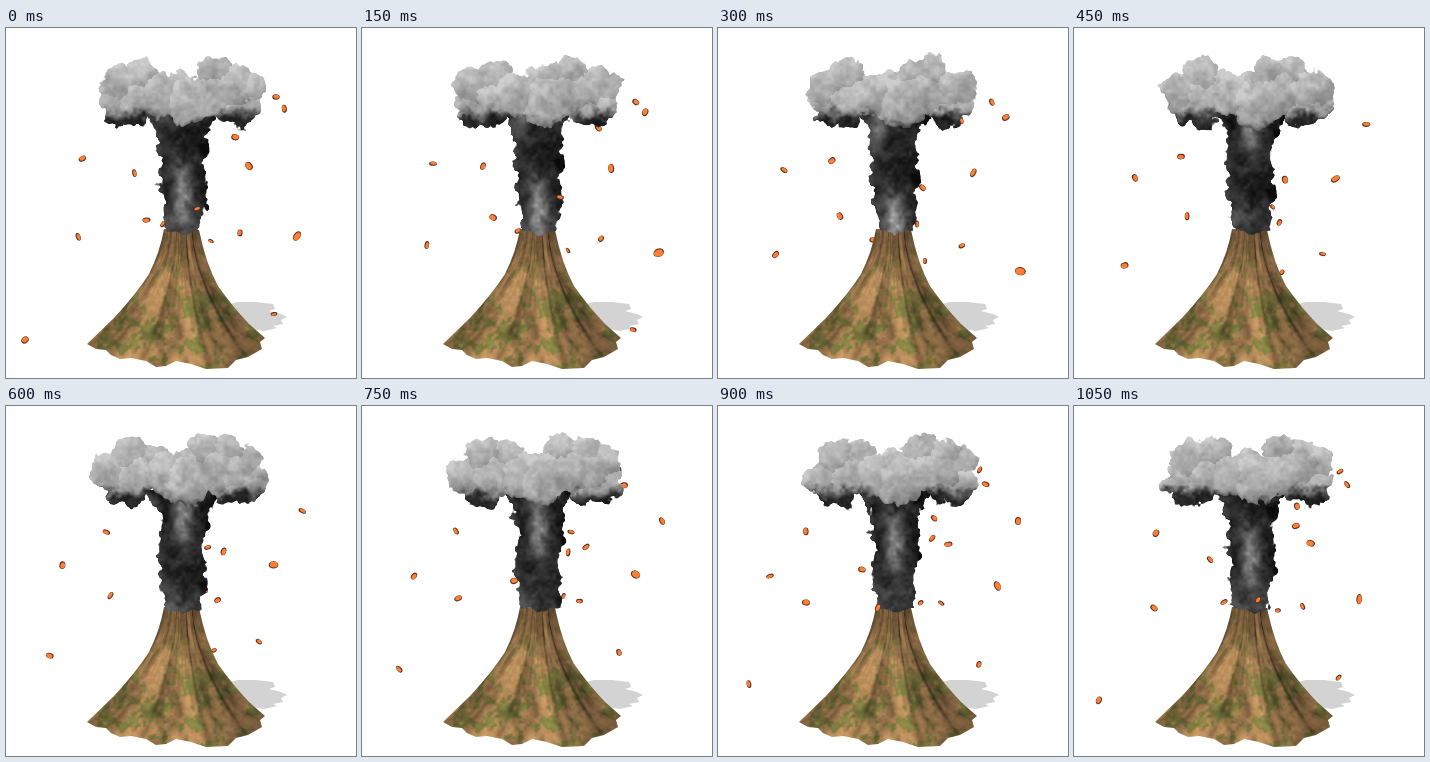
These frames come from a looping animation (350x350 px, 1.2 s). An HTML page with a canvas:

```html
<!DOCTYPE html>
<html lang="en">
<head>
<meta charset="utf-8">
<title>Volcano</title>
<style>
html, body { margin: 0; width: 100%; height: 100%; overflow: hidden; background: #fff; }
canvas { display: block; width: 100vw; height: 100vh; }
</style>
</head>
<body>
<canvas id="stage" width="350" height="350"></canvas>
<script>
const start = performance.now();
const SIZE = 350, STEPS = 8, STEP_MS = 150;
const SCROLL = 120; // vertical period of the smoke texture

const clamp = (v, lo = 0, hi = 1) => Math.min(hi, Math.max(lo, v));
const mix = (a, b, t) => a + (b - a) * t;
const smooth = (a, b, v) => { const t = clamp((v - a) / (b - a)); return t * t * (3 - 2 * t); };
const bell = v => Math.exp(-v * v);

function hash(i, j) {
  let h = Math.imul(i, 374761393) ^ Math.imul(j, 668265263);
  h = Math.imul(h ^ h >>> 13, 1274126177);
  return ((h ^ h >>> 16) >>> 0) / 2 ** 32;
}

function noise(x, y, cell) {
  const rows = SCROLL / cell;
  x /= cell; y /= cell;
  const i = Math.floor(x), j = Math.floor(y);
  const fx = smooth(0, 1, x - i), fy = smooth(0, 1, y - j);
  const row = n => ((n % rows) + rows) % rows;
  const a = row(j), b = row(j + 1);
  return mix(mix(hash(i, a), hash(i + 1, a), fx), mix(hash(i, b), hash(i + 1, b), fx), fy);
}

const fbm = (x, y) => .42 * noise(x, y, 12) + .33 * noise(x + 500, y, 6) + .25 * noise(x + 900, y, 3);

// Quadratic through three [time, x, y] points.
function along([a, b, c], k) {
  const wa = (k - b[0]) * (k - c[0]) / ((a[0] - b[0]) * (a[0] - c[0]));
  const wb = (k - a[0]) * (k - c[0]) / ((b[0] - a[0]) * (b[0] - c[0]));
  const wc = 1 - wa - wb;
  return [1, 2].map(n => wa * a[n] + wb * b[n] + wc * c[n]);
}

function layer(x0, y0, x1, y1, shade) {
  const canvas = document.createElement('canvas');
  canvas.width = canvas.height = SIZE;
  const g = canvas.getContext('2d');
  const image = g.createImageData(x1 - x0, y1 - y0);
  let p = 0;
  for (let y = y0; y < y1; y++) for (let x = x0; x < x1; x++, p += 4) {
    const c = shade(x, y);
    if (c) for (let n = 0; n < 4; n++) image.data[p + n] = c[n];
  }
  g.putImageData(image, x0, y0);
  return canvas;
}

// ---- Mountain ----
const coneShape = new Path2D(`M158 201 Q154 224 143 246 Q131 265 108 290 L81 316 L90 321 L100 322
  L105 327 L114 331 L125 330 L140 333 L150 339 L160 338 L170 333 L185 336 L200 341 L222 340
  L230 332 L242 329 L256 321 L254 314 L259 310 L243 296 Q226 278 212 258 Q200 236 193 202 Z`);
const shadowShape = new Path2D(`M220 277 L232 274 L250 274 L267 276 L269 281 L263 283 L275 286
  L281 289 L275 292 L277 296 L267 298 L271 300 L258 303 L240 300 Z`);

function coneColor(x, y) {
  const wide = 17 + 74 * Math.max(0, (y - 203) / 110) ** 1.7;
  const u = (x - 176) / wide;
  const ridge = noise(u * 46 + 200, y * .16, 6);
  const fine = noise(u * 60 + 700, y * .4, 3);
  const patch = fbm(x + 300, y * 1.15);
  let light = .62 + .36 * ridge + .2 * fine + .4 * (patch - .5);
  light *= 1 - .24 * smooth(.1, .7, u) - .14 * smooth(-.55, -1, u);
  light *= mix(.74, 1, smooth(203, 240, y));
  light -= .22 * bell((u - .22) / .035) + .2 * bell((u - .58) / .03) + .12 * bell((u + .35) / .03);
  const green = smooth(.46, .62, fbm(x * 1.1 + 40, y + 17)) * mix(.2, .85, smooth(215, 290, y));
  const tone = (a, b) => mix(a, b, green) * light;
  return [tone(178, 122), tone(136, 126), tone(88, 62), 255];
}

const cone = layer(75, 198, 262, 343, coneColor);
{
  const g = cone.getContext('2d');
  g.globalCompositeOperation = 'destination-in';
  g.fill(coneShape);
}

// ---- Smoke ----
// Resting puffs: x, y, radius, depth
const puffs = [
  [107, 70, 16, 0], [111, 86, 13, -4], [128, 88, 13, 0], [132, 70, 21, 6], [157, 68, 22, 12],
  [181, 74, 25, 14], [206, 66, 21, 10], [225, 62, 20, 5], [242, 57, 17, 2], [243, 76, 16, 0],
  [222, 82, 16, 2], [236, 87, 12, -3], [176, 58, 16, 6]
];
// Puffs that roll outward over several loops.
const rollers = [
  { from: 3, to: 23, r: 19, path: [[3, 150, 57], [10, 129, 48], [20, 102, 66]] },
  { from: 9, to: 29, r: 18, path: [[9, 191, 48], [16, 207, 44], [26, 240, 60]] }
];

function puffsAt(step) {
  const list = puffs.map(([x, y, r, z], n) => {
    const turn = 2 * Math.PI * step / STEPS + n * 2.4;
    return [x + 2 * Math.cos(turn), y + 1.5 * Math.sin(turn), r, z];
  });
  for (const { from, to, r, path } of rollers)
    for (let k = step; k <= to; k += STEPS) if (k >= from) {
      const grow = Math.min(1, .8 + (k - from) / 10, .5 + (to - k) / 6);
      list.push([...along(path, k), r * grow, 5]);
    }
  return list;
}

function smoke(step) {
  const list = puffsAt(step);
  const drift = step * SCROLL / STEPS;
  const streakY = 95 + (step + 5) % STEPS * 14;

  function cap(x, y, a, b) {
    const px = x + 13 * (a - .5), py = y + 13 * (b - .5);
    let top = -99, alpha = 0, up = 0, side = 0;
    for (const [cx, cy, r, z] of list) {
      const dx = px - cx, dy = py - cy, d2 = dx * dx + dy * dy;
      if (d2 >= r * r) continue;
      alpha = Math.max(alpha, clamp(r - Math.sqrt(d2)));
      const h = Math.sqrt(r * r - d2) + z;
      if (h > top) { top = h; up = -dy / r; side = dx / r; }
    }
    if (!alpha) return null;
    const edge = 85 + 13 * bell((x - 180) / 24);
    const grey = 172 + 24 * up - 8 * side + 75 * (a - .5) + 30 * (b - .5);
    const dark = smooth(edge - 8, edge + 9, y + 22 * (b - .5));
    return [clamp(mix(grey, 36 + 50 * (a - .5), dark), 12, 205), alpha];
  }

  function stem(x, y, a, b) {
    if (y < 84) return null;
    const flare = Math.exp(-(y - 88) / 11);
    const left = 153 - 12 * flare + 6 * clamp((y - 165) / 38);
    const right = 199 + 12 * flare - 5 * clamp((y - 170) / 33);
    const px = x + 15 * (a - .5);
    const end = 203 + 4 * bell((x - 179) / 7) + 7 * (b - .5);
    const alpha = Math.min(clamp(px - left), clamp(right - px), clamp(end - y));
    if (!alpha) return null;
    const glow = bell((x - 177) / 10) * bell((y - streakY) / 28)
      + .75 * bell((x - 159) / 9) * bell((y - streakY + 98) / 24);
    const haze = 30 * smooth(160, 200, y) + 18 * bell((x - left) / 7);
    return [clamp(28 + 75 * (a - .45) + (glow * 120 + haze) * (.35 + b), 10, 190), alpha];
  }

  return layer(80, 15, 270, 212, (x, y) => {
    const a = fbm(x, y - drift), b = fbm(x + 1300, y - drift);
    const c = cap(x, y, a, b), s = stem(x, y, a, b);
    if (!c && !s) return null;
    const front = c || s;
    const alpha = Math.max(c ? c[1] : 0, s ? s[1] : 0);
    const v = c && s ? mix(s[0], c[0], c[1]) : front[0];
    return [v, v, v, alpha * 255];
  });
}

// ---- Debris ----
// Pieces fly for several loops; a piece stays put after "stop" until "to".
const debris = [
  { from: 7, to: 26, size: 4, front: true, path: [[8, 191, 181], [16, 243, 138], [24, 291, 208]] },
  { from: 5, to: 22, stop: 21, size: 3.6, front: true, path: [[5, 152, 175], [13, 94, 125], [21, 52, 170]] },
  { from: 6, to: 24, size: 3.7, front: true, path: [[7, 150, 196], [15, 80, 202], [24, 19, 312]] },
  { from: 2, to: 17, size: 3.2, front: true, path: [[2, 199, 196], [8, 234, 205], [16, 268, 286]] },
  { from: 3, to: 22, stop: 21, size: 3.7, path: [[4, 198, 162], [12.5, 259, 80.5], [21, 300, 115]] },
  { from: 3, to: 18, stop: 17, size: 3.4, path: [[5, 209, 126], [13, 257, 64], [16, 270, 69]] },
  { from: 2, to: 12, stop: 11, size: 2.8, path: [[4, 200, 184], [8, 205, 213], [10, 207, 233]] },
  { from: 8, to: 10, size: 3.4, path: [[8, 157, 196], [9, 156, 203], [10, 155, 212]] }
];

function drawPiece(g, x, y, size, k, id) {
  const rx = size * (.72 + .12 * Math.sin(k * 1.3 + id)), ry = size * 1.08;
  g.save();
  g.translate(x, y);
  g.rotate(k * .55 + id * 1.7);
  g.fillStyle = '#593024';
  g.beginPath();
  g.ellipse(0, 0, rx, ry, 0, 0, 7);
  g.fill();
  g.fillStyle = '#ff7f32';
  g.beginPath();
  g.ellipse(.35, .3, rx - .7, ry - .8, 0, 0, 7);
  g.fill();
  g.restore();
}

function drawDebris(g, step, inFront) {
  debris.forEach(({ from, to, stop = to, size, front = false, path }, id) => {
    if (front !== inFront) return;
    for (let k = step; k <= to; k += STEPS) if (k >= from) {
      const [x, y] = along(path, Math.min(k, stop));
      const grown = id === 0 ? size * (.8 + .025 * (k - from)) : size;
      drawPiece(g, x, y, grown, k, id);
    }
  });
}

// ---- Playback ----
const stage = document.getElementById('stage').getContext('2d');
const plumes = [];
let shown = -1;

function draw(step) {
  plumes[step] ||= smoke(step);
  stage.fillStyle = '#fff';
  stage.fillRect(0, 0, SIZE, SIZE);
  stage.fillStyle = '#d3d3d3';
  stage.fill(shadowShape);
  drawDebris(stage, step, false);
  stage.drawImage(cone, 0, 0);
  stage.drawImage(plumes[step], 0, 0);
  drawDebris(stage, step, true);
}

function tick() {
  const step = Math.floor((performance.now() - start) / STEP_MS) % STEPS;
  if (step !== shown) draw(shown = step);
  requestAnimationFrame(tick);
}
tick();
</script>
</body>
</html>
```
